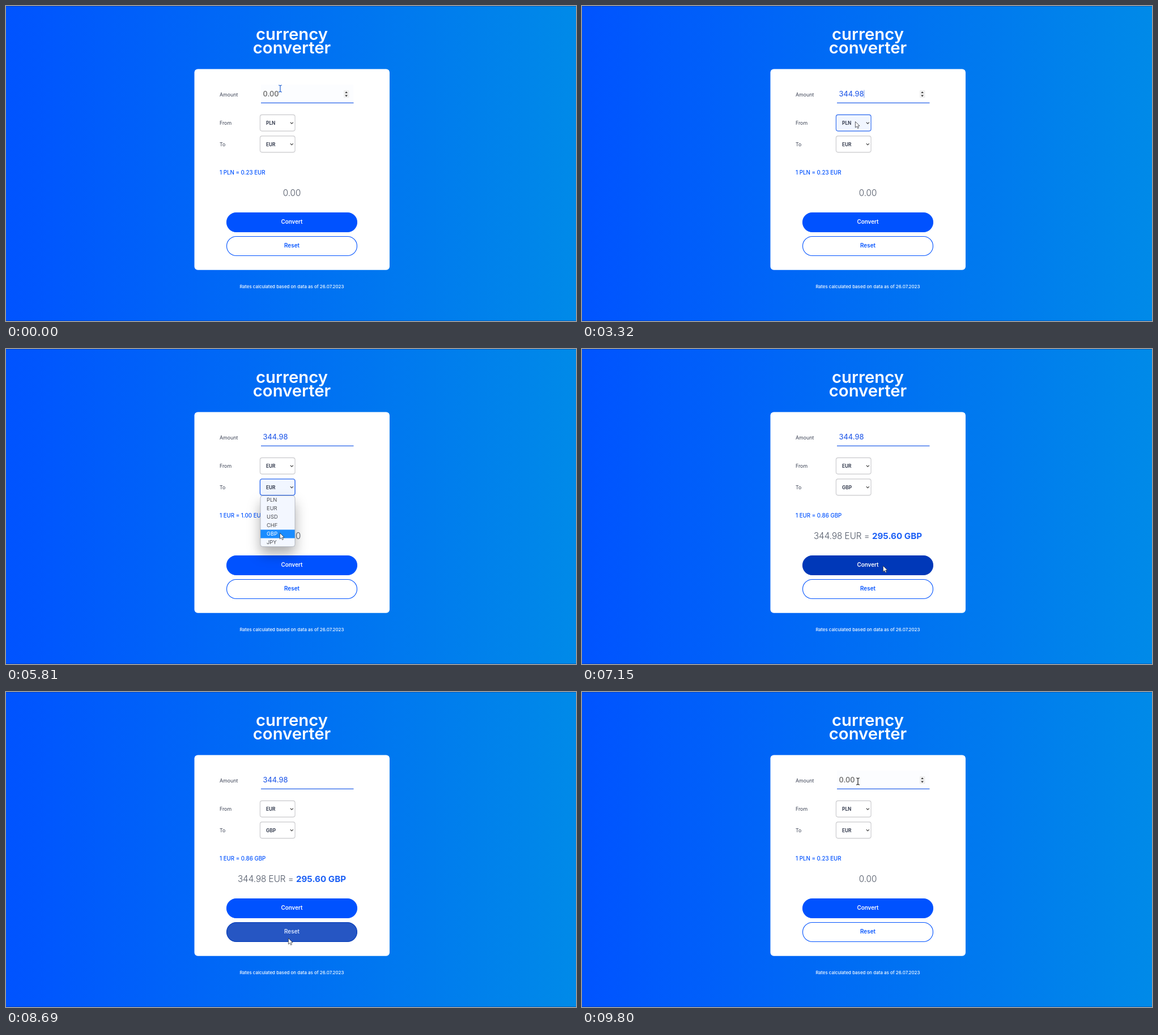
An HTML page that plays this animation: 1006 by 557 pixels, repeating every 9870 ms.

```html
<!DOCTYPE html>
<html lang="en">
<head>
<meta charset="utf-8">
<title>currency converter</title>
<style>
html, body { margin: 0; width: 100%; height: 100%; overflow: hidden; }
body { background: linear-gradient(to right, #0053ff, #008ae8); }
svg { display: block; width: 1006px; height: 557px; font-family: Inter, "Open Sans", sans-serif; white-space: pre; }
.list { filter: drop-shadow(0 13px 11px rgba(0, 0, 0, .32)); }
</style>
</head>
<body>
<svg id="stage" viewBox="0 0 1006 557"></svg>
<script>
const LOOP = 9870, STEP = 70, FADE = 200;
const BLUE = '#0052ff', DEEP = '#0038b8', INK = '#3b4254';
const CODES = ['PLN', 'EUR', 'USD', 'CHF', 'GBP', 'JPY'];

// pointer path: time, x, y
const path = [
  [0, 484, 146], [70, 486, 148], [210, 505, 160], [350, 558, 196], [420, 538, 184],
  [2770, 538, 184], [3320, 482, 204], [3590, 482, 204], [3720, 482, 206],
  [4000, 480, 258], [4200, 479, 243], [4350, 479, 243], [4720, 490, 240],
  [5340, 490, 240], [5810, 483, 325], [6150, 483, 325], [6850, 531, 383],
  [8070, 531, 383], [8320, 529, 388], [8690, 498, 435], [8900, 499, 432],
  [9050, 499, 432], [9700, 487, 160], [9800, 487, 158], [LOOP, 487, 158]
];

// what is typed and when
const typed = [[610, '3'], [810, '34'], [1010, '344'], [1620, '344.'], [2020, '344.9'], [2220, '344.98'], [9050, '']];

const field = { x: 450, y: 139, w: 163, h: 33 };
const from = { x: 448, y: 192, w: 62.5, h: 29.5 };
const to = { x: 448, y: 229.5, w: 62.5, h: 29.5 };
const convert = { x: 389, y: 365, w: 231, h: 35 };
const reset = { x: 389, y: 407, w: 231, h: 35 };

const within = (t, a, b) => t >= a && t < b;
const inside = ([x, y], b) => x >= b.x && x < b.x + b.w && y >= b.y && y < b.y + b.h;

function pointer(t) {
  t = Math.max(0, t);
  const i = Math.max(0, path.findIndex(p => p[0] > t) - 1);
  const [t0, x0, y0] = path[i], [t1, x1, y1] = path[i + 1];
  let k = Math.floor((t - t0) / STEP) * STEP / (t1 - t0);
  k = k * k * (3 - 2 * k);
  return [x0 + (x1 - x0) * k, y0 + (y1 - y0) * k];
}

// share of the last FADE ms spent over the box: a linear transition
function hover(t, box) {
  let n = 0;
  for (let i = 0; i < 20; i++) n += inside(pointer(t - i * FADE / 20), box);
  return n / 20;
}

const mix = (a, b, k) => `rgb(${a.map((v, i) => Math.round(v + (b[i] - v) * k))})`;

const text = (x, y, size, weight, fill, str, anchor = 'start') =>
  `<text x="${x}" y="${y}" font-size="${size}" font-weight="${weight}" fill="${fill}" text-anchor="${anchor}">${str}</text>`;

const rect = (x, y, w, h, r, fill, stroke = 'none', sw = 1) =>
  `<rect x="${x}" y="${y}" width="${w}" height="${h}" rx="${r}" fill="${fill}" stroke="${stroke}" stroke-width="${sw}"/>`;

function select(b, code, over, focus) {
  const line = over ? '#2a68f0' : focus ? '#0a50e6' : '#c9c9cc';
  return rect(b.x + .4, b.y + .4, b.w - .8, b.h - .8, 3.5, over ? '#f1f6ff' : '#fff', line, focus ? 1.4 : 1.1) +
    text(459, b.y + 18, 8.3, 700, INK, code) +
    `<path d="M501.8 ${b.y + 13.6}l2.5 2.6l2.5 -2.6" fill="none" stroke="#444" stroke-width="1.2"/>`;
}

function list(b, y) {
  const top = b.y + b.h + .5, row = 15, h = row * 6;
  const at = Math.floor((y - top) / row);
  const rows = CODES.map((c, i) =>
    (i === at ? rect(449, top + i * row, 61, row, 0, '#1a8cff') : '') +
    text(460, top + i * row + 10.9, 9.4, 400, i === at ? '#fff' : '#4b4d52', c)).join('');
  return `<g class="list">${rect(449, top, 61, h, 4, '#f3f7ff')}</g>
    <clipPath id="clip">${rect(449, top, 61, h, 4, '#000')}</clipPath>
    <g clip-path="url(#clip)">${rows}</g>${rect(449, top, 61, h, 4, 'none', '#a9adb5', .8)}`;
}

function button(b, label, fill, line, ink) {
  return rect(b.x + .5, b.y + .5, b.w - 1, b.h - 1, 17, fill, line, 1.1) +
    text(504.5, b.y + 20.4, 9.9, 600, ink, label, 'middle');
}

function cursor([x, y], beam, color) {
  if (beam) return `<path d="M${x - 3} ${y - 6}q3 0 3 1.5q0 -1.5 3 -1.5M${x} ${y - 5}v10M${x - 3} ${y + 6}q3 0 3 -1.5q0 1.5 3 1.5"
    fill="none" stroke="${color}" stroke-width="1.2"/>`;
  return `<path transform="translate(${x} ${y})" d="M.4 .4v10.6l2.5 -2.3l1.7 3.7l1.8 -.8l-1.7 -3.6h3.4z"
    fill="#fff" stroke="#30343c" stroke-width=".8"/>`;
}

function draw(t) {
  const pos = pointer(t);
  const amount = typed.reduce((s, [at, v]) => t >= at ? v : s, '');
  const a = within(t, 4350, 9050) ? 'EUR' : 'PLN';
  const b = within(t, 6150, 9050) ? 'GBP' : 'EUR';
  const rate = { PLNEUR: '0.23', EUREUR: '1.00', EURGBP: '0.86' }[a + b];
  const editing = within(t, 210, 3590);
  const overField = inside(pos, field);
  const openFrom = within(t, 3650, 4350), openTo = within(t, 4860, 6150);
  const open = openFrom || openTo;
  const dark = hover(t, convert), resetDark = hover(t, reset);
  const convertFill = mix([0, 82, 255], [0, 56, 184], dark);
  const result = within(t, 7150, 9050)
    ? `344.98 EUR = <tspan font-weight="700" fill="#1b5ff5">295.60 GBP</tspan>` : '0.00';

  let s = rect(0, 0, 1006, 1, 0, 'rgba(0,30,110,.35)') + rect(0, 556, 1006, 1, 0, 'rgba(0,30,110,.35)') +
    text(504.5, 59.8, 29.3, 600, '#fff', 'currency', 'middle') +
    text(504.5, 83.9, 29.3, 600, '#fff', 'converter', 'middle') +
    rect(332.5, 111.4, 344.5, 355.4, 6, '#fff') +
    text(377, 159.7, 8.8, 400, INK, 'Amount') +
    text(377, 210.2, 8.8, 400, INK, 'From') +
    text(377, 247.5, 8.8, 400, INK, 'To');

  if (overField) s += rect(field.x, field.y, field.w, field.h, 0, '#fcfdff');
  s += rect(450, 170.8, 163.5, 1.2, 0, '#1f5de8');
  s += amount ? `<g id="amount">${text(453.5, 160, 12.7, 500, '#2f63ea', amount)}</g>`
    : text(453.5, 160, 12.5, 600, '#757575', '0.00');
  if (editing || overField) {
    s += rect(596, 149, 9.5, 13.5, 1, '#efefef') +
      '<path d="M598.3 154h4.6l-2.3 -2.8zM598.3 157.6h4.6l-2.3 2.8z" fill="#333"/>';
  }
  if (editing) s += '<rect id="caret" x="453.5" y="148.5" width="1" height="14" fill="#7d9fe8"/>';

  s += select(from, a, openFrom || !open && inside(pos, from) && t < 9000, within(t, 3590, 4790)) +
    select(to, b, openTo || !open && inside(pos, to) && t < 9000, within(t, 4790, 7020)) +
    text(377, 297.6, 9.75, 500, BLUE, `1 ${a} = ${rate} ${b}`) +
    text(504.5, 336, 15.2, 300, '#4d5564', result, 'middle') +
    button(convert, 'Convert', convertFill, convertFill, '#fff') +
    button(reset, 'Reset', mix([255, 255, 255], [0, 56, 184], resetDark), resetDark ? DEEP : BLUE,
      mix([0, 82, 255], [255, 255, 255], resetDark)) +
    text(504.5, 498.7, 7.95, 500, '#fff', 'Rates calculated based on data as of 26.07.2023', 'middle');

  if (open) s += list(openFrom ? from : to, pos[1]);
  if (!within(t, 610, 2770)) s += cursor(pos, overField, t < STEP ? '#1f5fd0' : '#222');
  return s;
}

const stage = document.getElementById('stage');
let last = '';
function tick() {
  const html = draw(performance.now() % LOOP);
  if (html !== last) {
    stage.innerHTML = last = html;
    const caret = document.getElementById('caret'), value = document.querySelector('#amount text');
    if (caret && value) caret.setAttribute('x', 453.5 + value.getComputedTextLength());
  }
  requestAnimationFrame(tick);
}
tick();
</script>
</body>
</html>
```
